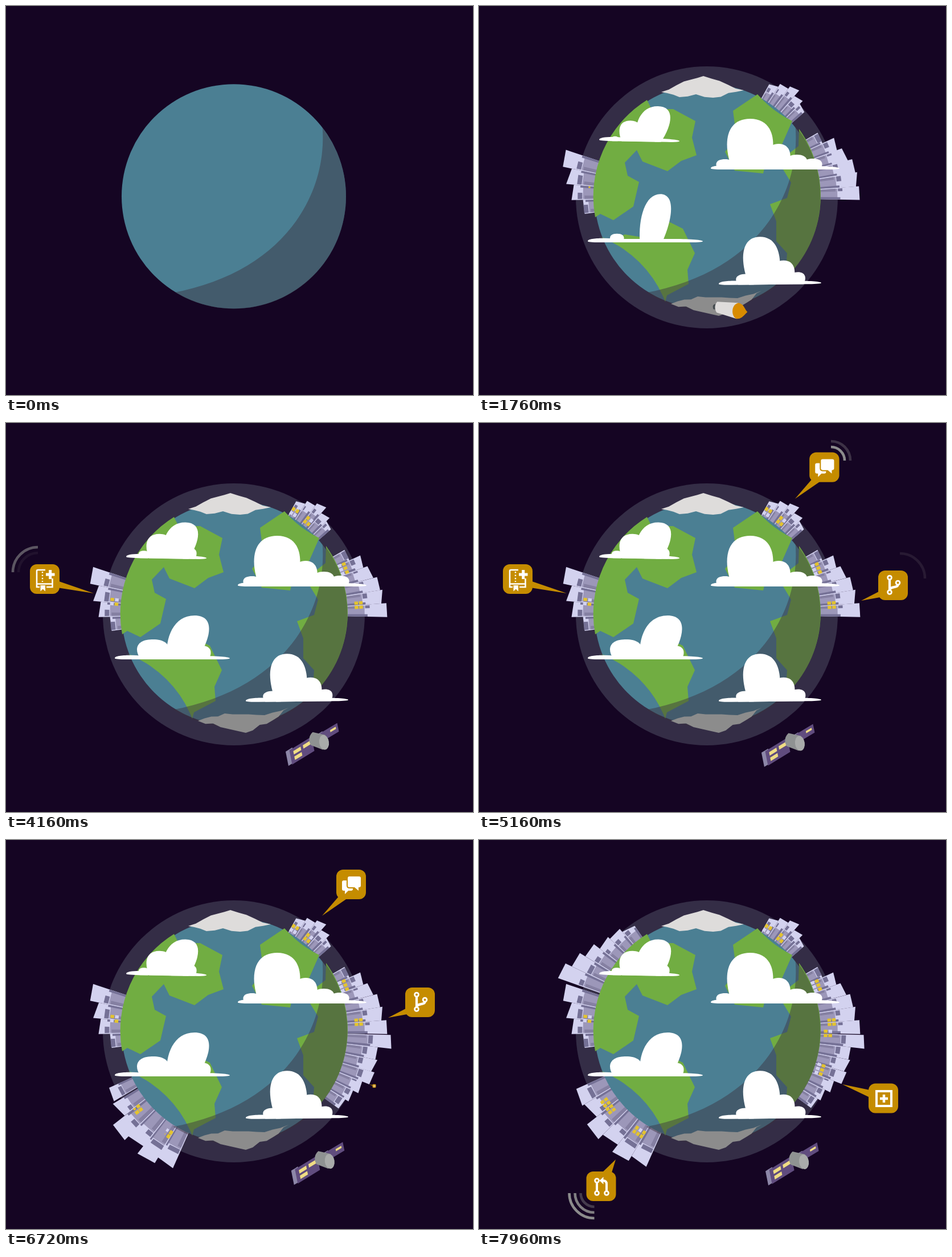
Recreate the animation shown at these times as an HTML page. Size 820x683 px, loop 8000 ms.

```html
<!DOCTYPE html>
<html lang="en">
<head>
<meta charset="utf-8">
<title>Planet</title>
<style>
html, body { margin: 0; width: 100%; height: 100%; overflow: hidden; background: #150523; }
svg { display: block; width: 100vw; height: 100vh; }
</style>
</head>
<body>
<svg id="stage" viewBox="0 0 820 683"></svg>
<script>
const LOOP = 8000, STEP = 40;
const LIGHT = '#d3d2ef', MID = '#9c97b9', DARK = '#757196', SIDE = '#8580a2';
const LAND = '#71ad42', YELLOW = '#e3c32f', GOLD = '#c58c00', GRAY = '#8c8c8c', ICE = '#dedcdb';
const stage = document.getElementById('stage');
const updates = [];

let seed = 11;
const rnd = () => (seed = seed * 16807 % 2147483647) / 2147483647;
const clamp = v => Math.max(0, Math.min(1, v));
const back = (p, s) => { const u = clamp(p) - 1; return 1 + (s + 1) * u ** 3 + s * u * u; };

function add(tag, attrs = {}, to = stage) {
  const el = document.createElementNS('http://www.w3.org/2000/svg', tag);
  for (const k in attrs) el.setAttribute(k, attrs[k]);
  return to.appendChild(el);
}
const group = (to, attrs) => add('g', attrs, to);
const path = (d, fill, to) => add('path', { d, fill }, to);
const poly = (points, fill, to) => add('polygon', { points, fill }, to);
const line = (d, width, to, stroke = '#fff') =>
  add('path', { d, fill: 'none', stroke, 'stroke-width': width }, to);

// Origins in px are stage points; percentages refer to the shape's own box.
function setOrigin(el, origin) {
  el.style.transformBox = origin.includes('%') ? 'fill-box' : 'view-box';
  el.style.transformOrigin = origin;
}
function pop(el, start, dur, s, origin = '50% 50%', end = 1e9) {
  setOrigin(el, origin);
  updates.push(t => {
    const k = t > end ? back(1 - (t - end) / dur, s) : back((t - start) / dur, s);
    el.style.transform = `scale(${k})`;
  });
  return el;
}

// --- Atmosphere
pop(add('circle', { cx: 400, cy: 336, r: 230, fill: '#342d46' }), 280, 800, .9, '400px 336px');

// --- Cities: towers standing radially on the rim, one per listed outer radius
function polar(a, r) {
  a *= Math.PI / 180;
  return [400 + r * Math.cos(a), 335 + r * Math.sin(a)];
}
function wedge(a0, a1, r0, r1, fill, to, slant = 0) {
  poly([polar(a0, r0), polar(a0, r1 - slant), polar(a1, r1 + slant), polar(a1, r0)].join(' '), fill, to);
}
function city(start, a0, width, radii) {
  radii.forEach((r, i) => {
    const a = a0 + i * width, b = a + width, g = group();
    const h = 200 + .4 * (r - 200) + 6 * rnd(), cut = a + width * (.2 + .6 * rnd());
    wedge(a, b, 190, r, LIGHT, g, 6 * rnd() - 3);
    wedge(a + .4, b, 190, h, MID, g);
    wedge(a + .4, a + .3 * width, 190, h - 3, SIDE, g);
    wedge(a + .4, cut, h + 1, h + 9, DARK, g);
    wedge(b - 1, b, 196, h + 5, DARK, g);
    pop(g, start + i * 50, 500, 1.3, polar(a + width / 2, 196).map(v => v + 'px').join(' '));
  });
}
function panes(start, a, r, rows) {
  const [x, y] = polar(a, r);
  const g = group(stage, { transform: `translate(${x} ${y}) rotate(${a})` });
  for (let i = 0; i < 2 * rows; i++) {
    const cell = { x: i % 2 * 8 - 7.5, y: ((i >> 1) - rows / 2) * 7.5, width: 6.5, height: 5.5 };
    pop(add('rect', { ...cell, fill: rnd() < .65 ? YELLOW : LIGHT }, g), start + i * 60, 300, 1.5);
  }
}

city(7160, 199.5, 6, [276, 262, 250, 238, 235, 226]);
city(1150, 172, 6.6, [217, 236, 245, 259]);
city(1150, -61, 4, [228, 237, 245, 236, 228]);
city(6160, 1.5, 5, [277, 254, 254, 255, 241, 233, 228]);
city(1300, -30, 5.2, [224, 243, 251, 260, 262, 269]);
city(6330, 114, 7, [259, 268, 256, 268, 248, 253]);

panes(1720, 186, 211, 2);
panes(2000, -59, 208, 2);
panes(2080, -51, 209, 2);
panes(2100, -22, 208, 3);
panes(2180, -3.7, 220, 2);
panes(6980, 1.5, 213, 2);
panes(7040, 19, 210, 3);
panes(6480, 143, 218, 4);
panes(6520, 124, 214, 3);

// --- Globe
add('circle', { cx: 400, cy: 334.3, r: 197, fill: '#4b7f93' });

// A coast runs through key points and closes along the rim.
function land(start, coast, sweep, origin) {
  const first = coast.split(' ', 2).join(' ');
  pop(path(`M${coast}A200 200 0 0 ${sweep} ${first}Z`, LAND), start, 420, 1, origin);
}
land(320, '295 165 303 181 341 181 380 202 374 231 382 262 355 272 331 290 287 273 277 253 256 275 261 298 281 309 271 352 236 376 213 365 204 371', 1);
land(280, '327 519 330 508 368 488 366 463 379 434 358 391 332 378 314 401 286 406 256 401 234 412 212 405', 1, '326px 479px');
land(400, '489 155 446 184 452 230 432 256 449 289 499 294 504 273 528 252 550 202', 1);
land(480, '562 216 561 246 543 260 534 287 548 310 541 337 511 348 522 378 522 413 541 434 539 462 529 486', 0);

const disc = add('circle', { cx: 400, cy: 334.6 }, add('clipPath', { id: 'disc' }));
updates.push(t => disc.setAttribute('r', 197 + 2.5 * clamp((t - 480) / 400)));
add('path', {
  d: 'M555 205C568 330 488 468 290 504V560H620V205Z',
  fill: '#3a303e', 'fill-opacity': .46, 'clip-path': 'url(#disc)'
});

// Ice caps: a few corners joined by jagged edges
function ice(start, corners, fill) {
  const points = [];
  corners.forEach(([x, y], i) => {
    const [u, v] = corners[(i + 1) % corners.length];
    const n = Math.ceil(Math.hypot(u - x, v - y) / 16);
    for (let k = 0; k < n; k++) {
      const jag = k ? 5 * rnd() - 2.5 : 0;
      points.push([x + (u - x) * k / n, y + (v - y) * k / n + jag]);
    }
  });
  pop(poly(points.join(' '), fill), start, 400, .9);
}
ice(520, [[320, 151], [373, 129], [394, 123], [465, 148], [411, 161], [381, 155], [352, 160]], ICE);
ice(560, [[337, 523], [384, 510], [454, 513], [496, 500], [470, 521], [421, 544], [390, 537]], GRAY);

// --- Clouds: a flat base, then domes [x, half width, height, lean] rising from it
function cloud(start, gap, y, x0, x1, turn, domes) {
  const g = group(stage, { transform: `rotate(${turn} ${(x0 + x1) / 2} ${y})` });
  const base = path(`M${x0} ${y - 2}C${x0} ${y - 8} ${x0 + 30} ${y - 8} ${x0 + 50} ${y - 6}H${x1 - 50}` +
    `C${x1 - 20} ${y - 6} ${x1} ${y - 4} ${x1} ${y - 2}Q${x1} ${y} ${x1 - 22} ${y}H${x0 + 22}Q${x0} ${y} ${x0} ${y - 2}Z`, '#fff', g);
  setOrigin(base, '50% 100%');
  updates.push(t => {
    base.style.transform = `scale(${back((t - start) / 360, .6)},${clamp((t - start) / 80)})`;
  });
  domes.forEach(([x, w, h, lean = 0], i) => {
    const mid = x + lean / 2, top = x + lean;
    const el = path(`M${x - .8 * w} ${y}C${mid - 1.25 * w} ${y - h / 2} ${top - 1.1 * w} ${y - h} ${top} ${y - h}` +
      `C${top + 1.1 * w} ${y - h} ${mid + 1.25 * w} ${y - h / 2} ${x + .8 * w} ${y}Z`, '#fff', g);
    setOrigin(el, '0% 100%');
    updates.push(t => {
      const k = back((t - start - 114 - i * gap) / 700, 1.7);
      el.style.transform = `scale(${k > 1 ? 1 - 2.6 * (k - 1) : k},${k})`;
    });
  });
}
cloud(1400, 60, 238, 211, 352, 1, [[298, 28, 64, 16], [269, 22, 43], [242, 9, 13], [321, 13, 20]]);
cloud(840, 30, 287, 407, 633, 0, [[476, 39, 89], [432, 15, 18], [526, 20, 45], [558, 18, 26], [586, 16, 19]]);
cloud(1240, 330, 415, 191, 393, 0, [[309, 33, 77, 22], [258, 27, 35], [344, 15, 24]]);
cloud(900, 30, 489, 421, 601, -.6, [[499, 31, 84, -5], [469, 17, 19], [535, 19, 42], [560, 13, 21]]);

// --- Rocket
const rocket = group();
path('M416 523Q408 523 411 532L417 533Z', '#454c50', rocket);
path('M418 519L455 521 452 549 417 538C413 532 413 524 418 519Z', ICE, rocket);
path('M455 521C466 524 464 529 471 537C462 546 460 549 452 549C442 545 442 524 455 521Z', '#d88b00', rocket);
setOrigin(rocket, '440px 534px');
updates.push(t => {
  const e = 1 - (1 - clamp((t - 1560) / 1100)) ** 3;
  const k = clamp((t - 1560) / 160) * clamp((2640 - t) / 160);
  rocket.style.transform = `translate(${171 * e - 77}px,${33 * e - 14.8}px) scale(${k})`;
});

// --- Satellite: panels are skewed boxes, with cells placed in panel units
const satellite = group();
function wing(start, origin, matrix, cells) {
  const g = group(satellite), panel = group(g, { transform: `matrix(${matrix})` });
  const box = (x, y, width, height, fill) => add('rect', { x, y, width, height, fill }, panel);
  box(-.16, -.06, .3, 1, '#8d87a8');
  box(0, 0, 1, 1, '#604c7e');
  for (const [x, y] of cells) box(x, y, .33, .24, '#f0dd84');
  pop(g, start, 300, 1, origin);
}
wing(2740, '545px 550px', '30 -18 3 15 544 542', [[.55, .3]]);
wing(2760, '530px 556px', '39 -24 5 25 490 572', [[.15, .2], [.58, .2], [.15, .58]]);
const hull = group(satellite);
path('M531 540L553 545 549 571 528 563C523 556 524 546 531 540Z', '#8f9292', hull);
add('ellipse', { cx: 551, cy: 558, rx: 8.5, ry: 13, fill: '#a9abaa', transform: 'rotate(-8 551 558)' }, hull);
pop(hull, 2480, 240, 1, '540px 555px');
updates.push(t => {
  const x = 23.5 * (1 - Math.exp((3120 - Math.max(t, 2480)) / 2700));
  satellite.style.transform = `translate(${x}px,${x * .36}px)`;
});

// --- Signal arcs, lit and put out from the inside
function signal(start, x, y, sx, sy) {
  [24, 34, 44].forEach((r, i) => {
    const sweep = sx * sy < 0 ? 1 : 0;
    const arc = line(`M${x} ${y + sy * r}A${r} ${r} 0 0 ${sweep} ${x + sx * r} ${y}`, 4.6, stage, GRAY);
    updates.push(t => {
      const u = t - start;
      arc.style.opacity = clamp((u - i * 80) / 120) * (1 - clamp((u - 160 - i * 100) / 200));
    });
  });
}
signal(2840, 556, 563, 1, 1);

// --- Speech bubbles growing out of their tips
function bubble(start, end, x, y, tip, root, sx, sy, icon) {
  signal(start + 280, x + 26 + 12 * sx, y + 26 + 12 * sy, sx, sy);
  const g = group();
  poly(`${tip} ${root}`, GOLD, g);
  add('rect', { x, y, width: 52, height: 52, rx: 12, fill: GOLD }, g);
  icon(group(g, { transform: `translate(${x} ${y})` }));
  pop(g, start, 420, 3.4, tip.split(',').map(v => v + 'px').join(' '), end);
}
const ring = (cx, cy, to) => add('circle', { cx, cy, r: 3.4, fill: 'none', stroke: '#fff', 'stroke-width': 2.8 }, to);

bubble(3440, 6180, 42, 248, '154,299', '90,277 90,289', -1, -1, g => {
  line('M27 10H14Q12 10 12 12V40H17M29 40H39.5V25M12 34.5H40', 2.6, g);
  line('M22 13V31', 2.4, g).setAttribute('stroke-dasharray', '2.4 3');
  line('M28 18H43.5M35.7 10V26', 5, g);
  poly('18.5,37 27,37 27,47.5 22.7,43.5 18.5,47.5', '#fff', g);
});
bubble(4352, 7240, 701, 259, '671,312', '704,295 704,306', 1, -1, g => {
  ring(20, 12.5, g);
  ring(20, 38, g);
  ring(34.5, 21.5, g);
  line('M20 16V34.5M34.5 25C34.5 31 20 27 20 34.5', 4.2, g);
});
bubble(4760, 7040, 580, 52, '555,133', '586,97 600,102', 1, -1, g => {
  path('M13 19H26Q29 19 29 22V34Q29 37 26 37H21L15 43V37H13Q10 37 10 34V22Q10 19 13 19Z', '#fff', g);
  const front = path('M23 12H40Q43 12 43 15V28Q43 31 40 31H39V37L32 31H23Q20 31 20 28V15Q20 12 23 12Z', '#fff', g);
  front.setAttribute('stroke', GOLD);
  front.setAttribute('stroke-width', 4);
  front.setAttribute('paint-order', 'stroke');
});
bubble(6712, 1e9, 684, 427.5, '638,429', '686,439 686,452', 1, 1, g => {
  line('M14 13.5H40V39.5H14Z', 4, g);
  line('M20 26.5H34M27 19.5V33.5', 4.4, g);
});
bubble(7400, 1e9, 188.5, 582, '240,561', '216,584 233,584', -1, 1, g => {
  ring(18.5, 16, g);
  ring(18.5, 38, g);
  ring(35.5, 38, g);
  line('M18.5 19V35M35.5 35V22Q35.5 16 29 16', 4, g);
  poly('30,9.5 30,22.5 23,16', '#fff', g);
});

const origin = performance.now();
function draw(now) {
  const t = Math.floor(Math.max(0, now - origin) % LOOP / STEP) * STEP;
  for (const update of updates) update(t);
  requestAnimationFrame(draw);
}
draw(origin);
</script>
</body>
</html>
```
